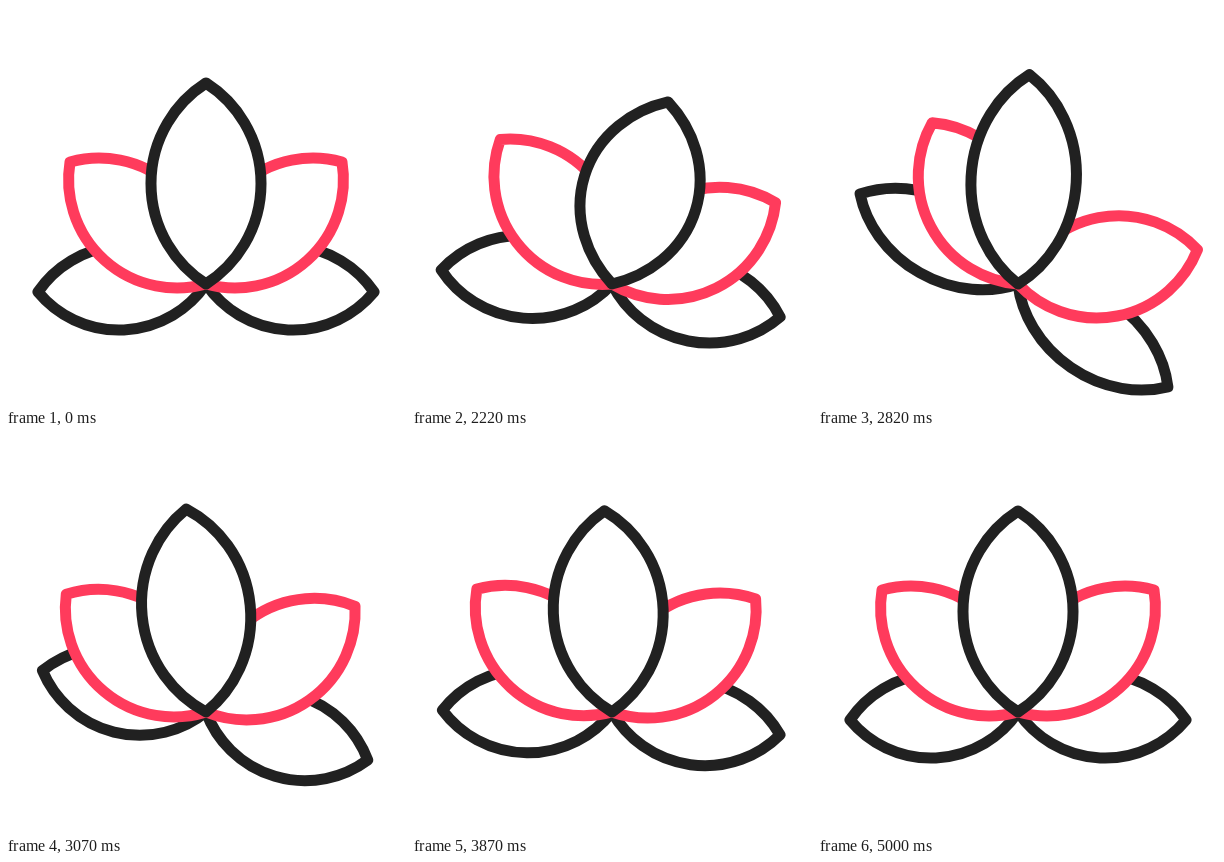
An HTML page that plays this animation: 400x400 px, repeating every 5020 ms.

```html
<!DOCTYPE html>
<html lang="en">
<head>
<meta charset="utf-8">
<title>Lotus</title>
<style>
  html, body { margin: 0; width: 100%; height: 100%; overflow: hidden; background: #fff; }
  svg { display: block; width: 100%; height: 100%; }

  path {
    fill: #fff;
    stroke: #212121;
    stroke-width: 11;
    stroke-linejoin: round;
    vector-effect: non-scaling-stroke;
    transform-origin: 0 0;
    animation: 5020ms cubic-bezier(.37, 0, .63, 1) infinite;
  }
  .inner { stroke: #ff3b5c; }

  /* Each petal swings around the shared base; squash keeps its area. */
  .center { animation-name: swing-center, squash-center; }
  .inner.left { animation-name: swing-inner-left; }
  .inner.right { animation-name: swing-inner-right; }
  .outer.left { animation-name: swing-outer-left, squash-outer; }
  .outer.right { animation-name: swing-outer-right, squash-outer; }

  @keyframes swing-center {
    0% { rotate: 0deg; }
    40.24% { rotate: 0deg; animation-timing-function: cubic-bezier(.37, 0, .5, 1); }
    48.8% { rotate: 32.4deg; }
    59.76% { rotate: -6deg; }
    69.32% { rotate: 2.7deg; }
    78.69% { rotate: -2.5deg; }
    87.65% { rotate: 1.2deg; }
    94.62%, 100% { rotate: 0deg; }
  }
  @keyframes squash-center {
    0%, 40.24% { scale: 1 1; }
    48.6% { scale: 1.12 .888; }
    56.77% { scale: .955 1.045; }
    65.74% { scale: 1.02 .982; }
    73.7% { scale: .997 1.003; }
    81.7%, 100% { scale: 1 1; }
  }
  @keyframes swing-inner-left {
    0% { rotate: 0deg; }
    40.24% { rotate: 0deg; animation-timing-function: cubic-bezier(.25, 0, .5, 1); }
    52.59% { rotate: 28.5deg; }
    63.35% { rotate: -5deg; }
    72.51% { rotate: 2.5deg; }
    82.07% { rotate: -2deg; }
    91.63% { rotate: 1deg; }
    99.6%, 100% { rotate: 0deg; }
  }
  @keyframes swing-inner-right {
    0% { rotate: 0deg; }
    40.24% { rotate: 0deg; animation-timing-function: cubic-bezier(.25, 0, .35, 1); }
    53.19% { rotate: 36.5deg; }
    66.53% { rotate: -9.3deg; }
    77.69% { rotate: 3.8deg; }
    88.05% { rotate: -2.5deg; }
    95.62% { rotate: .8deg; }
    99.6%, 100% { rotate: 0deg; }
  }
  @keyframes swing-outer-left {
    0% { rotate: 0deg; }
    40.24% { rotate: 0deg; animation-timing-function: cubic-bezier(.3, 0, .5, 1); }
    55.58% { rotate: 32.6deg; }
    68.13% { rotate: -5.3deg; }
    78.29% { rotate: 3.6deg; }
    88.65% { rotate: -3.5deg; }
    99.6%, 100% { rotate: 0deg; }
  }
  @keyframes swing-outer-right {
    0% { rotate: 0deg; }
    40.24% { rotate: 0deg; animation-timing-function: cubic-bezier(.25, 0, .5, 1); }
    55.58% { rotate: 32deg; }
    67.93% { rotate: -10.7deg; }
    79.68% { rotate: 7deg; }
    91.43% { rotate: -3deg; }
    99.6%, 100% { rotate: 0deg; }
  }
  @keyframes squash-outer {
    0%, 40.24% { scale: 1 1; }
    53.78% { scale: .915 1.093; }
    66.33% { scale: 1.05 .952; }
    76.69% { scale: .992 1.008; }
    85.66%, 100% { scale: 1 1; }
  }
</style>
</head>
<body>
<svg viewBox="0 0 400 400">
  <g transform="translate(200 278)">
    <g transform="rotate(-92.7)"><path class="outer left" d="M0 0A105.2 105.2 0 0 1 0 -168.2A105.2 105.2 0 0 1 0 0Z"/></g>
    <g transform="rotate(92.7)"><path class="outer right" d="M0 0A105.2 105.2 0 0 1 0 -168.2A105.2 105.2 0 0 1 0 0Z"/></g>
    <g transform="rotate(-48.1)"><path class="inner left" d="M0 0A108.4 108.4 0 0 1 0 -182.7A108.4 108.4 0 0 1 0 0Z"/></g>
    <g transform="rotate(48.1)"><path class="inner right" d="M0 0A108.4 108.4 0 0 1 0 -182.7A108.4 108.4 0 0 1 0 0Z"/></g>
    <path class="center" d="M0 0A119.3 119.3 0 0 1 0 -201A119.3 119.3 0 0 1 0 0Z"/>
  </g>
</svg>
</body>
</html>
```
